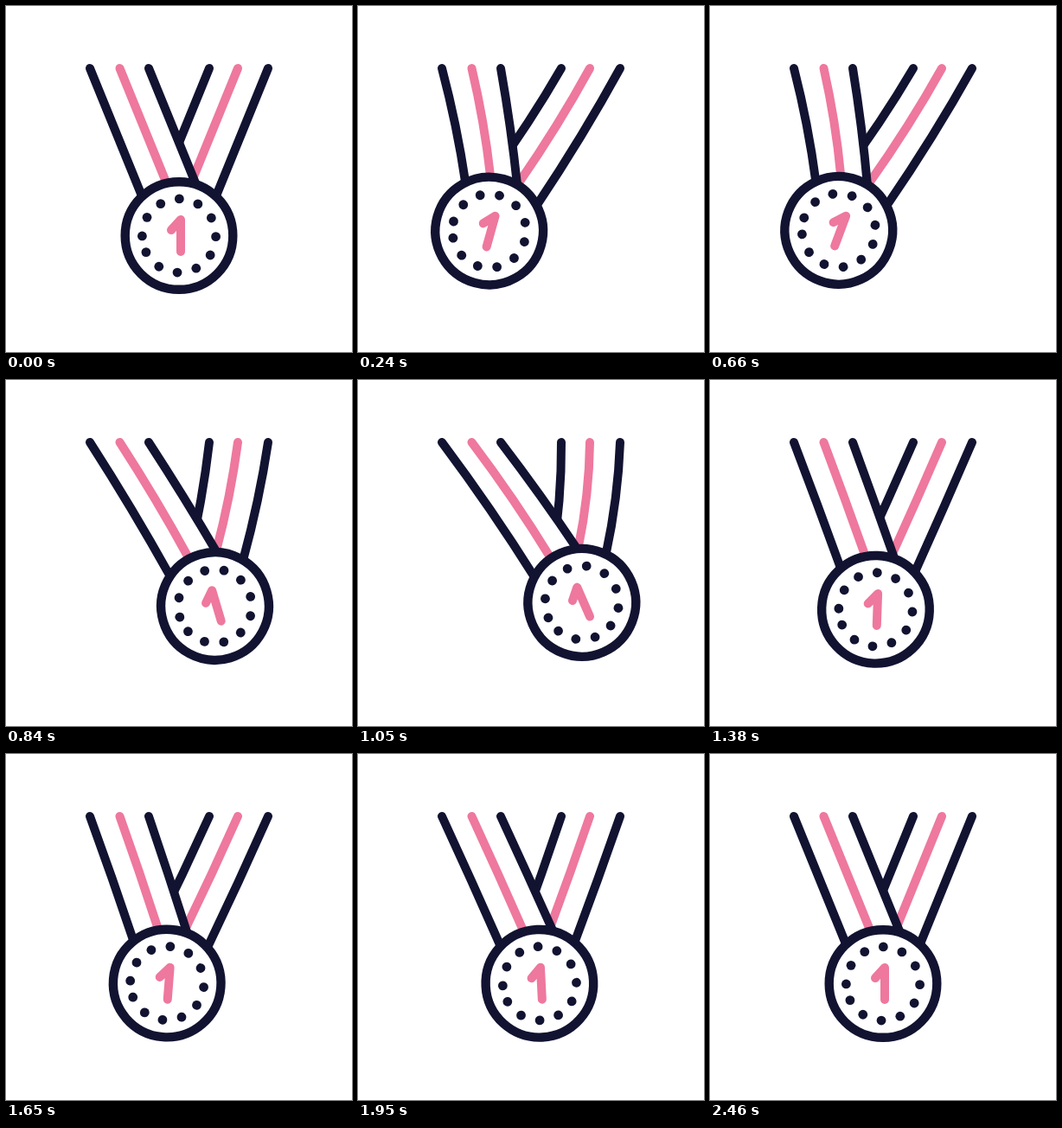
Write an HTML page that moves like this. It is 400 px wide and 400 px high and loops after 3.09 s.

```html
<!DOCTYPE html>
<html lang="en">
<head>
<meta charset="utf-8">
<title>Swinging medal</title>
<style>
  html, body { margin: 0; width: 100%; height: 100%; overflow: hidden; background: #fff; }
  svg { display: block; width: 100vw; height: 100vh; }
  path, .ring { stroke-linecap: round; stroke-linejoin: round; stroke-width: 10; fill: none; }
  .navy { stroke: #121331; }
  .pink { stroke: #ee789e; }
  .ring { stroke-width: 10.4; fill: #fff; }
  .dots { fill: #121331; }
  #cover { fill: #fff; }
</style>
</head>
<body>
<svg viewBox="0 0 400 400">
  <g id="right"></g>
  <path id="cover"/>
  <g id="left"></g>
  <g id="medal">
    <circle class="ring navy" r="62.3"/>
    <g class="dots" id="dots"></g>
    <path class="pink" d="M-9 -6.5L2 -18.5V18.5"/>
  </g>
</svg>
<script>
const LOOP = 3090, STEP = 30;
const REST = { x: 200, y: 265.5 }, LENGTH = 217, RAD = Math.PI / 180;
const SLOPE = 0.407, TOP = 72;

// Turning points of the swing: time in steps, sideways offset, medal tilt.
const turns = [
  [0, 0, 0], [19, -58.5, 23.5], [32.6, 62.5, -25],
  [50.3, -20, 6.4], [66, 10.2, -3], [82, 0, 0]
];

const $ = id => document.getElementById(id);
const mix = (a, b, k) => a + (b - a) * k;
const sine = u => (1 - Math.cos(Math.PI * u)) / 2;
const out = power => u => 1 - (1 - u) ** power;

function add(parent, tag, attrs) {
  const el = document.createElementNS('http://www.w3.org/2000/svg', tag);
  for (const key in attrs) el.setAttribute(key, attrs[key]);
  return parent.appendChild(el);
}

// Steeper than a sine at mid-swing, slower near the ends.
function sharp(u) {
  let lo = 0, hi = 1;
  for (let i = 0; i < 24; i++) {
    const s = (lo + hi) / 2, r = 1 - s;
    if (1.8 * s * r * r + 1.2 * s * s * r + s ** 3 < u) lo = s; else hi = s;
  }
  return lo * lo * (3 - 2 * lo);
}

function pose(step) {
  if (step >= 82) return { x: 0, tilt: 0 };
  const i = turns.findIndex(k => step < k[0]) - 1;
  const [t0, x0, r0] = turns[i], [t1, x1, r1] = turns[i + 1];
  const u = (step - t0) / (t1 - t0);
  const ease = i === 1 ? sharp : sine;
  return {
    x: mix(x0, x1, (i ? ease : out(3.2))(u)),
    tilt: mix(r0, r1, (i ? ease : out(2))(u))
  };
}

// A strand runs from a fixed top to a point on the rim, given relative to the medal centre.
// pull slides that point along the rim as the swing widens; bend bows the strand outwards.
const strand = (group, color, top, y, pull, bend) => {
  const side = group === 'left' ? 1 : -1;
  return {
    el: add($(group), 'path', { class: color }),
    top, pull, bend,
    end: [top + side * SLOPE * (y - TOP) - REST.x, y - REST.y]
  };
};
const strands = [
  strand('right', 'navy', 235, 207, 0.28, 0.1),
  strand('right', 'pink', 268, 203, 0.18, 0.1),
  strand('right', 'navy', 303, 220, 0.18, 0.1),
  strand('left', 'pink', 131.5, 203, -0.1, 0.08),
  strand('left', 'navy', 97, 220, 0.08, 0.08),
  strand('left', 'navy', 165, 207, -0.25, 0.05)
];

for (let i = 0; i < 12; i++) {
  const a = (179.4 + i * 30.36) * RAD;
  add($('dots'), 'circle', { cx: 42.6 * Math.cos(a), cy: 42.6 * Math.sin(a), r: 5.4 });
}

function draw(step) {
  const { x, tilt } = pose(step);
  const swing = Math.asin(-x / LENGTH);
  const cx = REST.x + x, cy = REST.y - LENGTH * (1 - Math.cos(swing));
  $('medal').setAttribute('transform', `translate(${cx} ${cy}) rotate(${tilt})`);

  const ends = strands.map(({ el, top, pull, bend, end: [ex, ey] }) => {
    const turn = 1.25 * swing + pull * Math.abs(swing);
    const c = Math.cos(turn), s = Math.sin(turn);
    const px = cx + ex * c - ey * s, py = cy + ex * s + ey * c;
    const curve = `${(top + px) / 2 + bend * Math.abs(x)} ${(TOP + py) / 2} `;
    el.setAttribute('d', `M${top} ${TOP}Q${curve}${px} ${py}`);
    return { px, py, curve };
  });
  const [a, b] = ends.slice(4);
  $('cover').setAttribute('d',
    `M97 ${TOP}Q${a.curve}${a.px} ${a.py}L${b.px} ${b.py}Q${b.curve}165 ${TOP}Z`);
}

function tick() {
  draw(Math.floor(performance.now() % LOOP / STEP));
  requestAnimationFrame(tick);
}
tick();
</script>
</body>
</html>
```
